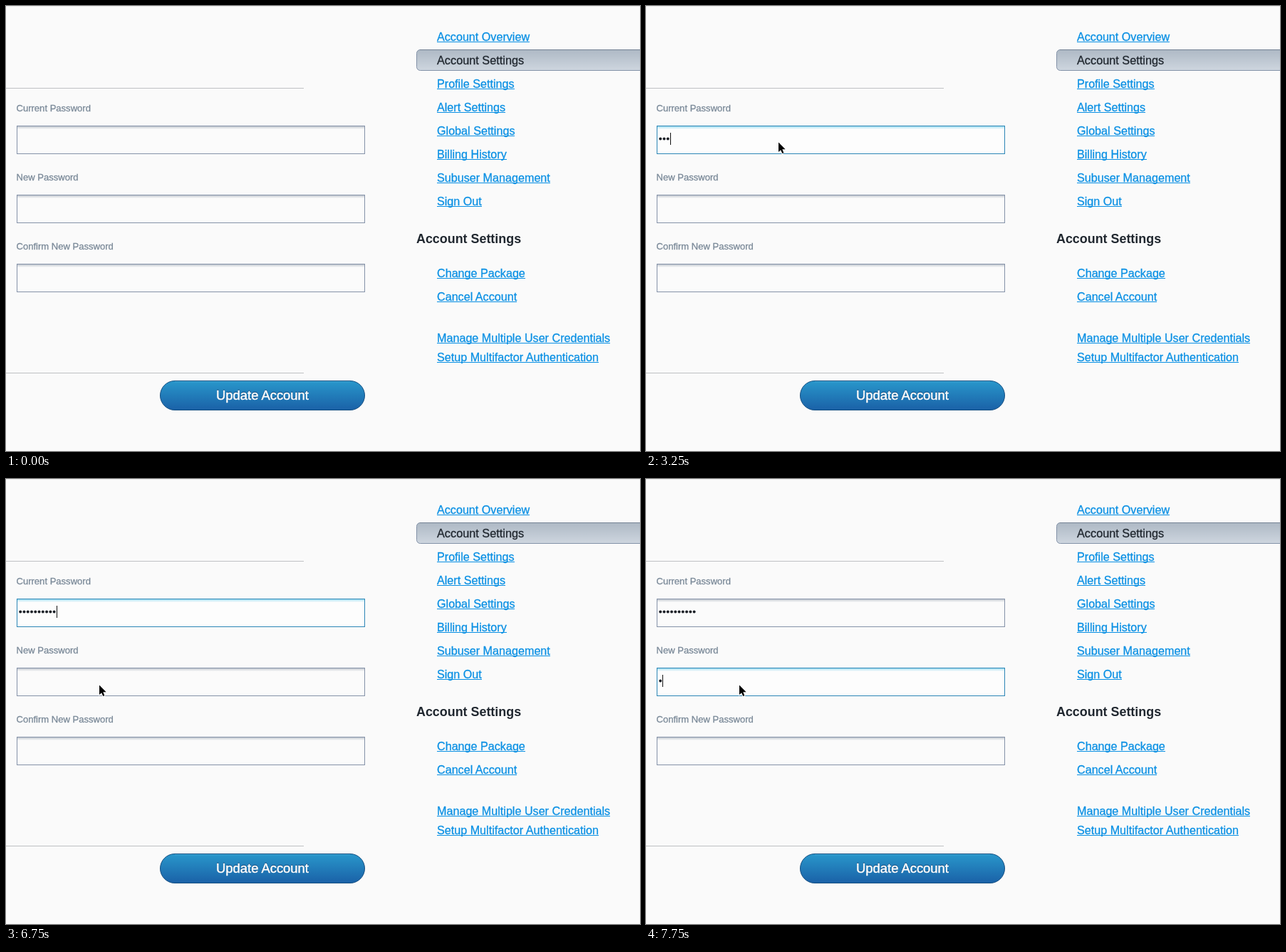
Recreate the animation shown at these times as an HTML page. Size 890x625 px, loop 8000 ms.

```html
<!DOCTYPE html>
<html lang="en">
<head>
<meta charset="utf-8">
<title>Account settings</title>
<style>
html, body { margin: 0; width: 100%; height: 100%; overflow: hidden; background: #fafafa; }
svg { display: block; }
text { font-family: "Liberation Sans", Arial, sans-serif; stroke-width: .3px; }
.link { font-size: 16.15px; fill: #0a90e4; stroke: #0a90e4; }
.rule { fill: #0a90e4; }
.active { font-size: 16.3px; fill: #20272f; stroke: #20272f; }
.label { font-size: 13.05px; fill: #7a8998; stroke: #7a8998; }
.head { font-size: 17.9px; font-weight: bold; fill: #20272f; }
.button { font-size: 18.4px; text-anchor: middle; fill: #fff; stroke: #fff; stroke-width: .5px; }
.under { fill: #124a7c; stroke: #124a7c; }
</style>
</head>
<body>
<svg width="890" height="625" viewBox="0 0 890 625">
  <defs>
    <linearGradient id="bar" x2="0" y2="1">
      <stop offset="0" stop-color="#aeb9c5"/><stop offset="1" stop-color="#ced6df"/>
    </linearGradient>
    <linearGradient id="blue" x2="0" y2="1">
      <stop offset="0" stop-color="#2997cb"/><stop offset="1" stop-color="#1a61a7"/>
    </linearGradient>
    <linearGradient id="shade" x2="0" y2="1">
      <stop offset="0" stop-color="#8793a3" stop-opacity=".5"/><stop offset="1" stop-color="#8793a3" stop-opacity="0"/>
    </linearGradient>
    <linearGradient id="glow" x2="0" y2="1">
      <stop offset="0" stop-color="#6fcdea" stop-opacity=".65"/><stop offset="1" stop-color="#6fcdea" stop-opacity="0"/>
    </linearGradient>
  </defs>
  <rect width="890" height="625" fill="#fafafa"/>
  <rect width="890" height="1" fill="#ececec"/>
  <rect y="115" width="418" height="1" fill="#bfc1c3"/>
  <rect y="515" width="418" height="1" fill="#bfc1c3"/>
  <rect x="576.5" y="61.5" width="330" height="29" rx="5" fill="url(#bar)" stroke="#8392a8"/>
  <path d="M581 61.5H890" stroke="#748294"/>
  <rect x="216.5" y="526.5" width="287" height="41" rx="20.5" fill="url(#blue)" stroke="#154f82"/>
  <path d="M237 527.5H483" stroke="#58b3dc" stroke-opacity=".5"/>
  <g id="page"></g>
  <path id="cursor" d="M0 0V13.6L3.1 10.7 5.3 15.6 7.4 14.7 5.3 9.8H9.6Z" stroke="#fff" stroke-width="1.6" paint-order="stroke"/>
</svg>
<script>
const LOOP = 8000, STEP = 250, BLINK = 500, DOT = 5.27, ROW = 33;
const page = document.getElementById('page');
const cursor = document.getElementById('cursor');

function add(tag, attrs, text) {
  const el = document.createElementNS('http://www.w3.org/2000/svg', tag);
  for (const k in attrs) el.setAttribute(k, attrs[k]);
  if (text) el.textContent = text;
  return page.appendChild(el);
}
const write = (cls, x, y, text) => add('text', { class: cls, x, y }, text);

function link(y, text) {
  const width = Math.round(write('link', 605, y, text).getComputedTextLength());
  add('rect', { class: 'rule', x: 605, y: y + 1, width, height: 1 });
}
const list = (y, gap, names) => names.forEach((s, i) => link(y + gap * i, s));

link(49, 'Account Overview');
write('active', 605, 82, 'Account Settings');
list(115, ROW, ['Profile Settings', 'Alert Settings', 'Global Settings',
  'Billing History', 'Subuser Management', 'Sign Out']);
write('head', 576, 333, 'Account Settings');
list(381, ROW, ['Change Package', 'Cancel Account']);
list(472, 27, ['Manage Multiple User Credentials', 'Setup Multifactor Authentication']);
write('button under', 360, 552, 'Update Account');
write('button', 360, 553, 'Update Account');

// keys struck one after another, each burst at its own pace
const burst = (start, count, gap) => Array.from({ length: count }, (_, i) => start + i * gap);

function field(row, label, from, to, keys) {
  const y = 168 + 97 * row;
  write('label', 14.5, y - 20, label);
  const box = add('rect', { x: 15.5, y: y + .5, width: 488, height: 39 });
  const top = add('rect', { x: 16, y: y + 1, width: 487, height: 4 });
  const dots = keys.map((_, n) =>
    add('circle', { cx: 20.2 + DOT * n, cy: y + 18.5, r: 2, fill: '#1c2128' }));
  const caret = add('rect', { y: y + 10, width: 1, height: 17, fill: '#111' });
  return { box, top, dots, caret, from, to, keys };
}
const fields = [
  field(0, 'Current Password', 1750, 7000,
    [...burst(2750, 3, 250), ...burst(4000, 5, 160), ...burst(5300, 2, 150)]),
  field(1, 'New Password', 7000, LOOP, [7750]),
  field(2, 'Confirm New Password', LOOP, LOOP, [])
];

// pointer key points: time, x, y
const path = [[500, 291, 8.5], [750, 206, 165.5], [1250, 186, 191.5],
  [5750, 186, 191.5], [6250, 152, 279.5], [6750, 131, 289.5], [LOOP, 131, 289.5]];

function pointer(t) {
  const i = path.findIndex(p => p[0] > t);
  const [a, b] = [path[i - 1], path[i]];
  const k = (t - a[0]) / (b[0] - a[0]);
  return [1, 2].map(n => a[n] + (b[n] - a[n]) * k);
}

const show = (el, on) => el.setAttribute('visibility', on ? 'visible' : 'hidden');

function drawField(f, t) {
  const on = t >= f.from && t < f.to;
  const struck = f.keys.filter(k => k <= t);
  const last = Math.max(f.from, ...struck);
  f.box.setAttribute('fill', on ? '#fdfdfd' : '#fbfbfb');
  f.box.setAttribute('stroke', on ? '#2c86b6' : '#8592a8');
  f.top.setAttribute('fill', on ? 'url(#glow)' : 'url(#shade)');
  f.dots.forEach((d, n) => show(d, n < struck.length));
  f.caret.setAttribute('x', 18 + Math.round(DOT * struck.length));
  show(f.caret, on && Math.floor((t - last) / BLINK) % 2 === 0);
}

function draw(time) {
  const t = Math.floor(time % LOOP / STEP) * STEP;
  fields.forEach(f => drawField(f, t));
  const visible = t >= path[0][0];
  show(cursor, visible);
  if (visible) cursor.setAttribute('transform', `translate(${pointer(t)})`);
}

const start = performance.now();
function tick() {
  draw(performance.now() - start);
  requestAnimationFrame(tick);
}
tick();
</script>
</body>
</html>
```
